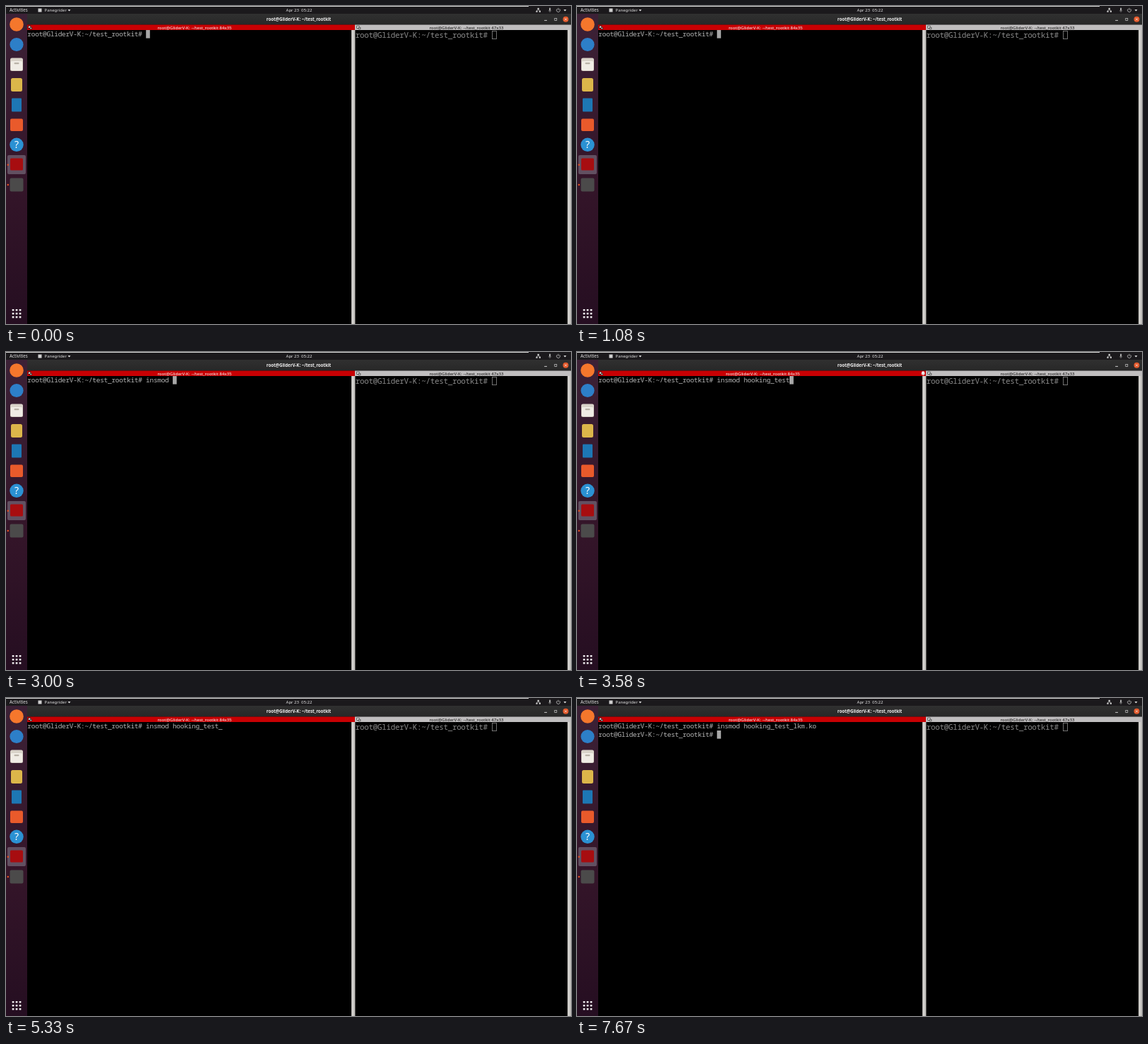
Recreate the animation shown at these times as an HTML page with a canvas. Size 800 px wide and 450 px high, loop 8 s.

```html
<!DOCTYPE html>
<html lang="en">
<head>
<meta charset="utf-8">
<title>Terminal session</title>
<style>
html, body { margin: 0; width: 100%; height: 100%; overflow: hidden; background: #000; }
canvas { display: block; width: 800px; height: 450px; }
</style>
</head>
<body>
<canvas id="stage" width="800" height="450"></canvas>
<script>
const ctx = document.getElementById('stage').getContext('2d');
const LOOP = 8000;
const UI = '"Noto Sans", "Open Sans", sans-serif';
const MONO = '"Noto Sans Mono", "DejaVu Sans Mono", monospace';
const HOST = 'root@GliderV-K:';
const PATH = '~/test_rootkit';
const PROMPT = HOST + PATH + '# ';
const TITLE = HOST + ' ' + PATH;

const LEFT = { x: 30.5, y: 34, cell: 5.41, line: 12, size: 9.5, color: '#b4b4b4' };
const RIGHT = { x: 495, y: 34.6, cell: 6.23, line: 12.6, size: 10.9, color: '#8a8a8a' };

// Each key press: time and the command line it leaves behind
const KEYS = [
  [1920, 'i'], [2000, 'in'], [2170, 'ins'], [2250, 'insm'],
  [2420, 'insmo'], [2500, 'insmod'], [2670, 'insmod '],
  [3250, 'insmod h'], [3330, 'insmod ho'], [3420, 'insmod hoo'],
  [3580, 'insmod hooking_test'], [4750, 'insmod hooking_test_'],
  [5920, 'insmod hooking_test_lkm.'], [6750, 'insmod hooking_test_lkm.k'],
  [6830, 'insmod hooking_test_lkm.ko ']
];
const ENTER = 7580, READY = 7670;
const BELLS = [[3580, 4580], [5920, 6920]];
const CURSOR_OFF = [[330, 920], [1500, 1920], [4170, 4670], [5330, 5920], [7420, 7580]];

const within = (t, spans) => spans.some(([a, b]) => t >= a && t < b);

function rect(x, y, w, h, color) {
  ctx.fillStyle = color;
  ctx.fillRect(x, y, w, h);
}

function disc(x, y, r, color) {
  ctx.fillStyle = color;
  ctx.beginPath();
  ctx.arc(x, y, r, 0, Math.PI * 2);
  ctx.fill();
}

function tile(x, y, w, h, r, color) {
  ctx.fillStyle = color;
  ctx.beginPath();
  ctx.roundRect(x, y, w, h, r);
  ctx.fill();
}

function stroke(color, width, ...lines) {
  ctx.strokeStyle = color;
  ctx.lineWidth = width;
  ctx.beginPath();
  for (const [x1, y1, x2, y2] of lines) {
    ctx.moveTo(x1, y1);
    ctx.lineTo(x2, y2);
  }
  ctx.stroke();
}

function label(text, x, y, size, color, align = 'left', weight = 400) {
  ctx.font = `${weight} ${size}px ${UI}`;
  ctx.textAlign = align;
  ctx.fillStyle = color;
  ctx.fillText(text, x, y);
}

function caret(x, y) {
  ctx.fillStyle = '#ddd';
  ctx.beginPath();
  ctx.moveTo(x - 2, y - 1);
  ctx.lineTo(x + 2, y - 1);
  ctx.lineTo(x, y + 1.4);
  ctx.fill();
}

// Terminal text sits on a fixed character grid
function termText(pane, text, row) {
  ctx.font = `${pane.size}px ${MONO}`;
  ctx.textAlign = 'center';
  ctx.fillStyle = pane.color;
  const y = pane.y + row * pane.line + pane.line * 0.79;
  [...text].forEach((ch, i) => ctx.fillText(ch, pane.x + (i + 0.5) * pane.cell, y));
}

function panel() {
  rect(0, 0, 800, 11, '#1b191c');
  rect(0, 0, 740, 0.9, '#ededed');
  label('Activities', 5, 8.2, 6.2, '#dedede');
  rect(45.5, 3.5, 5, 5, '#cfcfcf');
  label('Panegrider', 54.5, 8.2, 6, '#dedede');
  caret(89.5, 6);
  label('Apr 23  05:22', 415, 8.2, 6, '#e4e4e4', 'center');

  rect(752.5, 2.8, 2.4, 2.2, '#ccc');
  rect(750.4, 6.8, 2.2, 2, '#ccc');
  rect(754.8, 6.8, 2.2, 2, '#ccc');
  stroke('#ccc', 0.6, [753.7, 5, 753.7, 6], [751.5, 6, 756, 6], [751.5, 6, 751.5, 7], [756, 6, 756, 7]);

  tile(769, 2.5, 2.2, 4, 1.1, '#aaa');
  stroke('#aaa', 0.6, [768, 6.8, 772.2, 6.8], [770.1, 6.8, 770.1, 9]);

  ctx.strokeStyle = '#ccc';
  ctx.lineWidth = 0.8;
  ctx.beginPath();
  ctx.arc(782, 6, 2.5, -Math.PI * 0.3, Math.PI * 1.3);
  ctx.stroke();
  stroke('#ccc', 0.8, [782, 2.8, 782, 5.8]);
  caret(791.5, 6);
}

function dock() {
  const g = ctx.createLinearGradient(0, 11, 0, 450);
  g.addColorStop(0, '#3c2136');
  g.addColorStop(0.55, '#341529');
  g.addColorStop(1, '#250e21');
  rect(0, 11, 30, 439, g);

  disc(15, 26, 9.8, '#f5772c');
  disc(15, 54.5, 9.6, '#2d7fc8');

  tile(6, 73.5, 18, 18.5, 2.5, '#d9d3c9');
  tile(7, 78, 16, 13, 1.5, '#f0ece5');
  tile(11.5, 80, 7, 2.2, 1, '#b9b2a7');

  tile(7, 102, 16, 19, 2.5, '#dcb64a');
  tile(8, 130.5, 14, 19, 1, '#1d77b4');
  tile(6, 159.5, 18, 17.5, 2, '#e95a2b');

  disc(15, 196.3, 9.7, '#2b91d3');
  label('?', 15, 201.2, 14, '#fff', 'center');

  tile(2, 211, 26, 27, 2, '#625061');
  tile(6, 215.5, 18, 17, 1.5, '#a70d10');
  tile(5.5, 243.5, 19, 19, 2, '#4b4a4a');
  disc(2.8, 224.8, 1.2, '#e95420');
  disc(2.8, 253, 1.2, '#e95420');

  for (let i = 0; i < 9; i++) {
    tile(8.7 + (i % 3) * 5, 428.9 + Math.floor(i / 3) * 5, 2.7, 2.7, 0.7, '#f4f1f3');
  }
}

function windowBar() {
  const g = ctx.createLinearGradient(0, 11, 0, 26);
  g.addColorStop(0, '#303030');
  g.addColorStop(1, '#282828');
  rect(30, 11, 770, 15.6, g);
  label(TITLE, 414.5, 21.3, 6.1, '#f2f2f2', 'center', 700);
  stroke('#ddd', 0.9, [762.2, 20.4, 766, 20.4]);
  ctx.strokeStyle = '#ccc';
  ctx.lineWidth = 0.7;
  ctx.strokeRect(776.8, 17.4, 3, 3);
  disc(792.5, 18.8, 4, '#e3592b');
  stroke('#fff', 0.7, [791, 17.3, 794, 20.3], [794, 17.3, 791, 20.3]);
}

function splitIcon(x, front, back) {
  rect(x, 27.8, 4, 4, back);
  rect(x + 0.7, 28.5, 2.6, 2.6, front);
  rect(x + 2.4, 30, 3.4, 3, back);
  rect(x + 3.1, 30.7, 2, 1.6, front);
}

function paneBars(bell) {
  rect(30, 26.5, 464, 7.5, '#c80003');
  splitIcon(31.2, '#ddd', '#250404');
  label(TITLE + ' 84x35', bell ? 263 : 267, 32.5, 6.15, '#fff', 'center');
  if (bell) {
    tile(487.9, 27.3, 4.4, 4.6, 2, '#eee');
    rect(487.3, 30.6, 5.6, 1, '#ddd');
    disc(490.1, 32.3, 0.9, '#ddd');
  }
  rect(494, 26.5, 306, 7.5, '#c0bebf');
  splitIcon(496.4, '#eee', '#333');
  label(TITLE + ' 47x33', 652, 32.5, 6.15, '#111', 'center');

  rect(489, 34, 5.4, 416, '#bdbbb8');
  rect(490, 34, 2.8, 416, '#d0cecb');
  rect(795, 34, 5, 416, '#bdbbb8');
  rect(796, 34, 2.8, 416, '#d0cecb');
}

function cursor(col, row) {
  rect(LEFT.x + col * LEFT.cell, LEFT.y + row * LEFT.line, LEFT.cell + 0.2, LEFT.line - 0.4, '#a8a8a8');
}

function terminals(t) {
  let line = '';
  for (const [at, text] of KEYS) if (t >= at) line = text;
  const entered = t >= ENTER, ready = t >= READY;

  termText(LEFT, PROMPT + line, 0);
  if (ready) termText(LEFT, PROMPT, 1);
  if (!within(t, CURSOR_OFF)) {
    const col = entered ? (ready ? PROMPT.length : 0) : (PROMPT + line).length;
    cursor(col, entered ? 1 : 0);
  }

  termText(RIGHT, PROMPT, 0);
  ctx.strokeStyle = '#8c8c8c';
  ctx.lineWidth = 0.8;
  ctx.strokeRect(RIGHT.x + PROMPT.length * RIGHT.cell + 0.4, 35.4, 6, 11.2);
}

function draw(t) {
  rect(0, 0, 800, 450, '#000');
  terminals(t);
  windowBar();
  paneBars(within(t, BELLS));
  dock();
  panel();
}

const start = performance.now();
function tick() {
  draw((performance.now() - start) % LOOP);
  requestAnimationFrame(tick);
}
tick();
</script>
</body>
</html>
```
